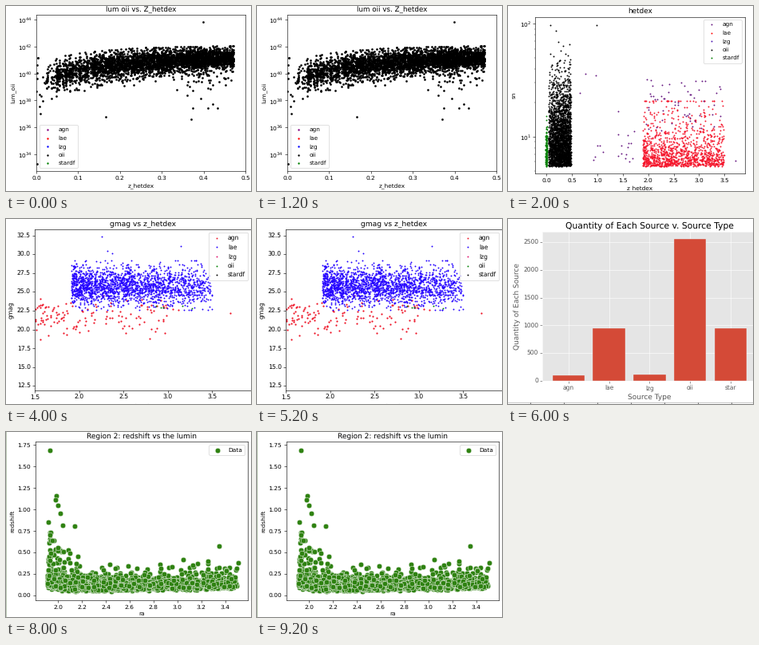
A matplotlib script that plays this animation: 307x232 px, repeating every 10000 ms.

```python
import numpy as np
import matplotlib.pyplot as plt
from matplotlib.animation import FuncAnimation

W, H, DPI = 307, 232, 64
PT = 72 / DPI  # points per pixel
rng = np.random.default_rng(12)

plt.rcParams.update({"font.family": "DejaVu Sans", "text.hinting": "none"})
fig = plt.figure(figsize=(W / DPI, H / DPI), dpi=DPI, facecolor="white")


def panel(left, top, right, bottom, title, xlabel, ylabel, ggplot=False):
    """Axes at a pixel box, with text and ticks scaled from the default figure."""
    ax = fig.add_axes([left / W, 1 - bottom / H, (right - left) / W, (bottom - top) / H])
    k = ax.k = (right - left) * PT / 357.12
    ink = "#555555" if ggplot else "black"
    title_size, label_size = (14.4, 12) if ggplot else (12, 10)
    ax.set_title(title, fontsize=title_size * k, pad=6 * k)
    ax.set_xlabel(xlabel, fontsize=label_size * k, labelpad=4 * k, color=ink)
    ax.set_ylabel(ylabel, fontsize=label_size * k, labelpad=4 * k, color=ink)
    ax.tick_params(which="major", length=3.5 * k, width=0.8 * k, pad=3.5 * k,
                   labelsize=10 * k, color=ink, labelcolor=ink)
    ax.tick_params(which="minor", length=2 * k, width=0.6 * k)
    for spine in ax.spines.values():
        spine.set_linewidth(0.8 * k)
    return ax


def dots(ax, x, y, color, size, **kw):
    kw.setdefault("linewidths", 0)
    return ax.scatter(x, y, s=(size * PT) ** 2, c=color, **kw)


def legend(ax, loc):
    box = ax.legend(loc=loc, fontsize=10 * ax.k)
    box.get_frame().set_linewidth(ax.k)


def source_legend(ax, colors, size, loc):
    for name, color in zip(["agn", "lae", "lzg", "oii", "stardf"], colors):
        dots(ax, [], [], color, size, label=name)
    legend(ax, loc)


def luminosity():
    ax = panel(38, 11, 300, 207, "lum oii vs. Z_hetdex", "z_hetdex", "lum_oii")
    ax.set_yscale("log")

    def cloud(x, y):
        dots(ax, x, 10**y, "black", 2.7)

    # redshifts bunch into loose columns at the low end
    x = 0.025 + 0.447 * rng.random(3400) ** 0.75
    columns = rng.choice(rng.uniform(0.025, 0.14, 18), x.size)
    x = np.where((x < 0.13) & (rng.random(x.size) < 0.5),
                 columns + rng.normal(0, 0.001, x.size), x)
    noise = rng.normal(0, 1, x.size).clip(-2.7, 2.3)
    cloud(x, 41.6 + 1.35 * np.log10(x) + noise * (0.58 - 0.42 * x))

    cloud(rng.normal(0.4, 0.035, 50).clip(0.3, 0.465),
          40.1 - rng.exponential(0.9, 50).clip(0, 2.7))
    x = rng.uniform(0.012, 0.3, 45)
    cloud(x, 39.1 + 2 * x + rng.normal(0, 0.35, 45))
    cloud(rng.exponential(0.01, 12), rng.uniform(37, 41.4, 12))
    cloud(np.array([0.399, 0.166, 0.37, 0.002]), np.array([43.8, 36.8, 36.6, 33.3]))

    source_legend(ax, ["purple", "red", "blue", "black", "green"], 2.4, "lower left")
    ax.set(xlim=(0, 0.5), ylim=(10**32.75, 10**44.35))
    ax.set_yticks([10.0**p for p in range(34, 45, 2)])
    ax.minorticks_off()
    return [ax]


def signal():
    ax = panel(34, 13.5, 296.5, 210, "hetdex", "z_hetdex", "sn")
    ax.set_yscale("log")
    violet, red = "#641580", "#f5142a"

    def cloud(x, log_sn, color):
        dots(ax, x, 10**log_sn, color, 1.9)

    def rise(n, spread):
        return 0.74 + np.abs(rng.normal(0, spread, n))

    cloud(rng.normal(0, 0.007, 130), rise(130, 0.18), "green")
    cloud(0.04 + 0.44 * rng.random(2560) ** 0.85, rise(2560, 0.34), "black")
    cloud(np.array([0.08, 0.99]), np.array([1.99, 1.99]), "black")
    cloud(1.9 + 1.59 * rng.random(1150) ** 1.2,
          0.74 + rng.exponential(0.15, 1150).clip(0, 0.58), red)
    cloud(1.95 + 1.5 * rng.random(55) ** 1.2, 1.05 + 0.46 * rng.random(55), violet)
    cloud(rng.uniform(1.4, 1.75, 14), rng.uniform(0.75, 1.28, 14), violet)
    cloud(rng.uniform(0.9, 1.15, 5), rng.uniform(0.75, 0.95, 5), violet)
    cloud(np.array([0.66, 0.77, 0.97, 3.71]), np.array([1.39, 1.56, 1.54, 0.79]), violet)

    source_legend(ax, [violet, "red", "#4a14b0", "black", "green"], 1.9, "upper right")
    ax.set(xlim=(-0.22, 3.895), ylim=(4.74, 115), xticks=np.arange(0, 3.6, 0.5))
    return [ax]


def magnitude():
    ax = panel(36, 13, 307, 215, "gmag vs z_hetdex", "z_hetdex", "gmag")
    red, blue = "#ee1426", "#2200ff"
    dots(ax, 1.5 + 1.5 * rng.random(120) ** 1.3,
         rng.normal(21.9, 1.25, 120).clip(18.9, 25.6), red, 2.2)
    dots(ax, rng.uniform(2.7, 3.3, 10), rng.uniform(22.3, 24, 10), red, 2.2)
    dots(ax, [3.707, 2.797, 1.563], [22.2, 18.8, 18.7], red, 2.2)
    dots(ax, 1.91 + 1.6 * rng.beta(0.95, 1.35, 1900),
         rng.normal(25.8, 1.3, 1900).clip(22.6, 29.2), blue, 1.9)
    dots(ax, [2.257, 3.149, 2.32, 2.374], [32.3, 31.1, 30.4, 30.1], blue, 1.9)
    dots(ax, rng.uniform(2.8, 3.3, 5), rng.uniform(22.7, 23.6, 5), "green", 1.9)

    source_legend(ax, [red, blue, "#e0146e", "green", "black"], 1.9, "upper right")
    ax.set(xlim=(1.5, 3.94), ylim=(11.9, 33.3),
           xticks=np.arange(1.5, 3.6, 0.5), yticks=np.arange(12.5, 33, 2.5))
    return [ax]


def quantity():
    ax = panel(43.3, 16, 311.5, 203, "Quantity of Each Source v. Source Type",
               "Source Type", "Quantity of Each Source", ggplot=True)
    ax.set_facecolor("#e5e5e5")
    ax.set_axisbelow(True)
    ax.grid(color="white", linewidth=0.8 * ax.k)
    for spine in ax.spines.values():
        spine.set_color("white")
    ax.bar(["agn", "lae", "lzg", "oii", "star"], [105, 945, 120, 2557, 945],
           color="#d44a37", edgecolor="#eeeeee", linewidth=0.5 * ax.k)
    ax.set(ylim=(0, 2685), xlim=(-0.644, 4.644), yticks=range(0, 2501, 500))

    # top edge of a cropped strip below the chart
    strip = fig.add_axes([0, 0, 1, 1])
    strip.set(xlim=(0, W), ylim=(H, 0))
    strip.axis("off")
    strip.plot([0, W], [229.5, 229.5], color="#999999", lw=0.6)
    strip.vlines(np.arange(28, W, 42), 230, H, color="#444444", lw=0.9)
    return [ax, strip]


def redshift():
    ax = panel(36.5, 12.5, 303, 211, "Region 2: redshift vs the lumin", "ra", "redshift")
    # a skewed band, lifted towards the low end
    x = 1.91 + 1.59 * rng.random(1900) ** 1.15
    band = rng.lognormal(-2.45, 0.5, x.size).clip(0, 0.33)
    y = 0.015 + 0.02 * (x - 1.9) + band * (1 + 1.3 * np.exp(-(x - 1.91) / 0.09))
    spike_x = 1.92 + rng.exponential(0.07, 28).clip(0, 0.25)
    spike_y = 0.35 + 0.45 * rng.random(28) * np.exp(-(spike_x - 1.92) / 0.2)
    peaks = np.array([(1.933, 1.69), (1.987, 1.156), (1.98, 1.11), (2.0, 1.045),
                      (2.02, 0.95), (1.92, 0.85), (2.04, 0.81), (2.14, 0.8),
                      (3.349, 0.571), (3.049, 0.413), (3.256, 0.395), (3.51, 0.376)])
    dots(ax, np.r_[x, spike_x, peaks[:, 0]], np.r_[y, spike_y, peaks[:, 1]], "#2f8212", 6.6,
         edgecolors="white", linewidths=0.5, label="Data")
    legend(ax, "upper right")
    ax.set(xlim=(1.809, 3.59), ylim=(-0.06, 1.784),
           xticks=np.arange(2, 3.5, 0.2), yticks=np.arange(0, 1.8, 0.25))

    edge = fig.add_axes([0, 0, 1 / W, 1], facecolor="#b9c7b4")
    edge.set(xticks=[], yticks=[])
    edge.spines[:].set_visible(False)
    return [ax, edge]


slides = [luminosity(), signal(), magnitude(), quantity(), redshift()]


def show(i):
    for j, axes in enumerate(slides):
        for ax in axes:
            ax.set_visible(i == j)
    return []


anim = FuncAnimation(fig, show, frames=len(slides), interval=2000,
                     init_func=lambda: show(0), repeat=True, repeat_delay=0, blit=False)
plt.show()
```
